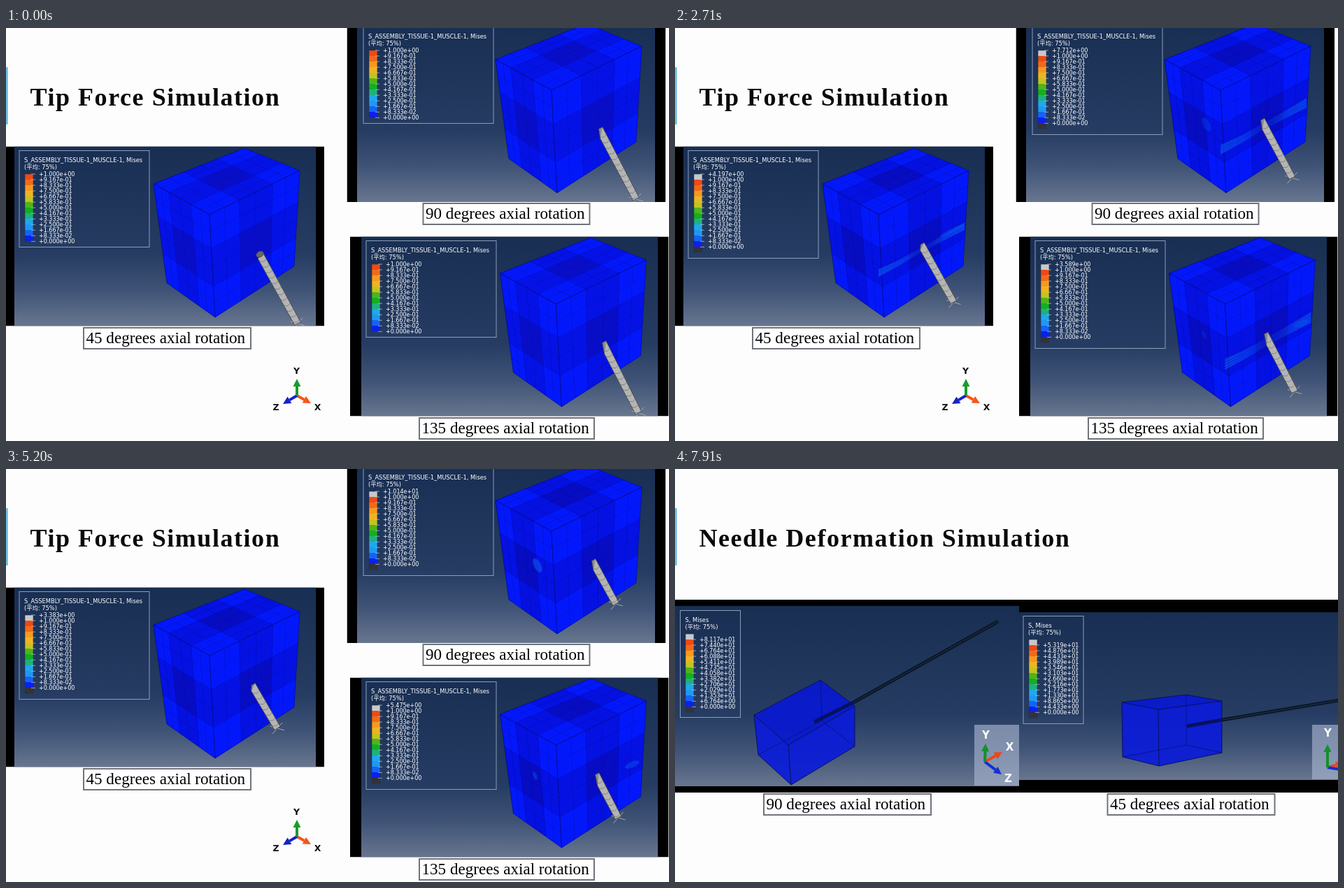
An HTML page with a canvas that plays this animation: 948x591 px, repeating every 8 s.

```html
<!DOCTYPE html>
<html lang="en">
<head>
<meta charset="utf-8">
<title>Needle simulation</title>
<style>
html, body { margin: 0; width: 100%; height: 100%; overflow: hidden; background: #fdfdfd; }
canvas { display: block; }
</style>
</head>
<body>
<canvas id="stage" width="948" height="591"></canvas>
<script>
const g = document.getElementById('stage').getContext('2d');
const SANS = '"DejaVu Sans", "Noto Sans CJK SC", "Noto Sans CJK", sans-serif';
const SERIF = '"Liberation Serif", serif';
const LOOP = 8000, CUT = 6260;
const SCALE = ['#ee4a14', '#f26a18', '#f59a1c', '#f0b422', '#c4c41c', '#50b41c',
  '#12b020', '#20b080', '#1ea8ee', '#1e98f4', '#1464f4', '#0a20f0'];

const lerp = (a, b, k) => a + (b - a) * k;
const mix = (p, q, k) => [lerp(p[0], q[0], k), lerp(p[1], q[1], k)];

// Value at time t on the shared key times
const KEYS = [0, 1120, 1850, 3470, 5200];
function at(t, v) {
  if (t >= KEYS[4]) return v[4];
  const i = KEYS.findLastIndex(k => k <= t);
  return lerp(v[i], v[i + 1], (t - KEYS[i]) / (KEYS[i + 1] - KEYS[i]));
}

// The clips advance in uneven steps
const STEPS = [0, 200, 530, 1120, 1320, 1520, 1850, 2050, 2380, 2580, 2910];
function snap(t) {
  if (t < 2910) return STEPS.findLast(s => s <= t);
  if (t >= 5200) return 5200;
  const s = 2910 + Math.floor((t - 2910) / 70) * 70;
  return s > 4800 && s < 5060 ? 4800 : s;
}

function text(s, x, y, font, color = '#000', spacing = 0, align = 'left') {
  g.font = font;
  g.fillStyle = color;
  g.textAlign = align;
  g.letterSpacing = spacing + 'px';
  g.fillText(s, x, y);
}

function path(points, closed = true) {
  g.beginPath();
  points.forEach(p => g.lineTo(p[0], p[1]));
  if (closed) g.closePath();
}

function fill(points, color) {
  path(points);
  g.fillStyle = color;
  g.fill();
}

function line(points, color, width = 1) {
  path(points, false);
  g.strokeStyle = color;
  g.lineWidth = width;
  g.stroke();
}

function rect(x0, y0, x1, y1, color) {
  g.fillStyle = color;
  g.fillRect(x0, y0, x1 - x0, y1 - y0);
}

function backdrop(x0, y0, x1, y1) {
  const sky = g.createLinearGradient(0, y0, 0, y1);
  sky.addColorStop(0, '#182e52');
  sky.addColorStop(0.6, '#263c62');
  sky.addColorStop(0.8, '#3f5376');
  sky.addColorStop(1, '#68768f');
  rect(x0, y0, x1, y1, sky);
}

function sci(v) {
  if (v < 1e-9) return '+0.000e+00';
  const [m, e] = v.toExponential(3).split('e');
  return `+${m}e${e[0]}0${e.slice(1)}`;
}

// Colour bar with its labels; x, y is the top left of the bar
function bar(x, y, labels, capped) {
  const colors = capped ? ['#c8c8cc', ...SCALE, '#333336'] : SCALE;
  colors.forEach((c, i) => rect(x, y + i * 8, x + 12, y + i * 8 + 8, c));
  g.strokeStyle = '#26324a';
  g.lineWidth = 0.6;
  g.strokeRect(x, y, 12, colors.length * 8);
  const first = capped && labels.length === 13 ? y + 8 : y;
  labels.forEach((s, i) => {
    const ly = first + i * 8.03;
    line([[x + 9, ly], [x + 15, ly]], '#c4ccd8', 0.7);
    text(s, x + 20, ly + 2.9, '8px ' + SANS, '#fff');
  });
}

function legend(title, x, y, w, h) {
  g.strokeStyle = '#8c9db8';
  g.lineWidth = 1;
  g.strokeRect(x + 0.5, y + 0.5, w, h);
  text(title, x + 7.5, y + 16.5, '8.3px ' + SANS, '#fff');
  text('(平均: 75%)', x + 7.5, y + 26.5, '8.3px ' + SANS, '#fff');
}

function caption(s, x, y, w) {
  rect(x, y, x + w, y + 32, '#6f747b');
  rect(x + 2, y + 2, x + w - 2, y + 30, '#fff');
  text(s + ' degrees axial rotation', x + 4.5, y + 23, '23.1px ' + SERIF);
}

function heading(s) {
  rect(0.5, 56, 2.3, 138, '#2ea3d6');
  text(s, 34.5, 110.5, 'bold 36px ' + SERIF, '#0a0a0a', 1.55);
}

function arrow(a, b, color, width = 4) {
  const d = Math.hypot(b[0] - a[0], b[1] - a[1]);
  const ux = (b[0] - a[0]) / d, uy = (b[1] - a[1]) / d;
  const n = [b[0] - ux * 11, b[1] - uy * 11];
  line([a, n], color, width);
  fill([b, [n[0] - uy * 5.5, n[1] + ux * 5.5], [n[0] + uy * 5.5, n[1] - ux * 5.5]], color);
}

// Block face; the mesh is denser, and so darker, inside the u and v ranges
const TONES = ['#0318fa', '#0512e6', '#080ec8'];
function face(a, b, c, d, [u0, u1], [v0, v1], dense) {
  const p = (u, v) => mix(mix(a, b, u), mix(d, c, u), v);
  const us = [0, u0, u1, 1], vs = [0, v0, v1, 1];
  const across = (k, color) => line([p(k, 0), p(k, 1)], color, 0.7);
  const along = (k, color) => line([p(0, k), p(1, k)], color, 0.7);
  fill([a, b, c, d], TONES[0]);
  for (let i = 0; i < 3; i++) for (let j = 0; j < 3; j++) {
    const [u, U, v, V] = [us[i], us[i + 1], vs[j], vs[j + 1]];
    fill([p(u, v), p(U, v), p(U, V), p(u, V)], TONES[(i === 1) + (j === 1)]);
  }
  for (let i = 0; i < 3; i++) {
    for (const k of [us[i], (us[i] + us[i + 1]) / 2]) across(k, 'rgba(6,10,130,.38)');
    for (const k of [vs[i], (vs[i] + vs[i + 1]) / 2]) along(k, 'rgba(6,10,130,.38)');
  }
  if (dense) for (let k = 0.04; k < 1; k += 0.08) {
    across(lerp(u0, u1, k), 'rgba(4,8,120,.16)');
    along(lerp(v0, v1, k), 'rgba(4,8,120,.16)');
  }
  line([a, b, c, d, a], 'rgba(6,12,120,.6)', 0.9);
}

function patch(x, y, rx, ry, turn, alpha) {
  if (alpha <= 0) return;
  g.save();
  g.globalAlpha = alpha;
  g.translate(x, y);
  g.rotate(turn);
  g.beginPath();
  g.ellipse(0, 0, rx, ry, 0, 0, 7);
  g.fillStyle = '#0a52ee';
  g.fill();
  g.clip();
  for (let i = -rx; i < rx; i += 3) line([[i, -ry], [i + 2, ry]], '#127cdc', 0.7);
  g.restore();
}

// Strongest at both outer edges, faint around the needle
function stressBand(t, thick) {
  const alpha = t < 530 ? 0 : at(t, [0, 0.95, 0.8, 0, 0]);
  if (alpha <= 0) return;
  const shade = rgb => {
    const s = g.createLinearGradient(291, 0, 414, 0);
    [[0, 1], [0.25, 0.75], [0.45, 0.3], [0.6, 0.3], [0.8, 0.8], [1, 1]]
      .forEach(([k, a]) => s.addColorStop(k, `rgba(${rgb},${a})`));
    return s;
  };
  g.save();
  g.globalAlpha = alpha;
  const top = [[291, 345], [322, 331], [353, 314], [384, 296], [414, 278]];
  const low = top.map(([x, y], i) => [x, y + thick - (i === 2 ? 5 : i % 2 * 3)]);
  fill([...top, ...low.slice().reverse()], shade('10,92,236'));
  for (const k of [0.2, 0.45, 0.7, 0.92])
    line(top.map((p, i) => mix(p, low[i], k)), shade('20,142,222'), 0.8);
  g.restore();
}

function needle(t, shift, bevel) {
  const tip = [at(t, [362, 355, 352, 352, 352]) - shift * 0.5, at(t, [322, 314, 310, 309, 309])];
  const end = [at(t, [417, 408, 403, 393, 388]) - shift, at(t, [423, 410, 402, 381, 371])];
  const len = Math.hypot(end[0] - tip[0], end[1] - tip[1]);
  for (const [x, y] of [[10, 3], [7, -8]])
    line([[end[0] - x, end[1] - y], [end[0] + x, end[1] + y]], '#aab2be', 0.9);
  g.save();
  g.translate(...tip);
  g.rotate(Math.atan2(end[1] - tip[1], end[0] - tip[0]));
  const body = [[0, -5], [len, -4.8], [len, 4.8], [bevel, 5.5], [0, 1]];
  fill(body, '#b4b4b2');
  fill([[0, -5], [bevel, 5.5], [0, 1]], '#8a8c8c');
  for (let x = 12; x < len; x += 9) line([[x, -5], [x + 2, 0], [x - 1, 5]], '#74767a', 0.7);
  path(body);
  g.strokeStyle = '#44464e';
  g.lineWidth = 0.8;
  g.stroke();
  if (t < 200 && bevel < 8) {
    g.beginPath();
    g.ellipse(2, 0, 4, 5.5, 0, 0, 7);
    g.fillStyle = '#66686a';
    g.fill();
    g.stroke();
  }
  g.restore();
}

const [A, B, C, D, E, F, G] = [[211, 223], [341, 172], [420, 204], [291, 267],
  [299, 414], [230, 365], [412, 341]];
// Dense ranges along the width, depth and height of the block
const WIDE = [0.33, 0.7], DEEP = [0.27, 0.67], HIGH = [0.33, 0.7];
// frame: outer left/right, picture left/right, top, bottom
const PANELS = [
  { frame: [0, 455, 12, 443, 169.5, 426.5], block: [0, 0], key: [0, 0], shift: 0, bevel: 7, thick: 11,
    peak: [0, 2.467, 3.483, 5.068, 3.383],
    spots: [[396, 290, 19, 3, -0.44, [0, 0, 0, 0.8, 0]]] },
  { frame: [487.5, 943, 502, 928, -7, 249], block: [489, -178], key: [492, -177], shift: 5, bevel: 13, thick: 14,
    peak: [0, 4.890, 5.912, 9.907, 10.14],
    spots: [[271, 316, 11, 5, 1.1, [0, 0, 0, 0.55, 0.55]]] },
  { frame: [492, 947.5, 508, 932, 298.5, 555.5], block: [495.5, 128], key: [496, 129], shift: 8, bevel: 16, thick: 16,
    peak: [0, 3.650, 1.840, 5.721, 5.475],
    spots: [[400, 295, 11, 4, -0.4, [0, 0, 0, 0.8, 0.4]], [261, 311, 6, 2.5, 1.2, [0, 0, 0, 0.4, 0.4]]] }
];
const UNIT = Array.from({ length: 13 }, (_, i) => sci(1 - i / 12));

function panel(p, t) {
  const [x0, x1, px0, px1, y0, y1] = p.frame;
  const touched = t >= 530;
  g.save();
  g.beginPath();
  g.rect(x0, y0, x1 - x0, y1 - y0);
  g.clip();
  rect(x0, y0, x1, y1, '#000');
  backdrop(px0, y0, px1, y1);
  g.save();
  g.translate(...p.key);
  legend('S_ASSEMBLY_TISSUE-1_MUSCLE-1, Mises', 18.5, 175, 186, touched ? 154 : 138);
  bar(27, 209, touched ? [sci(at(t, p.peak)), ...UNIT] : UNIT, touched);
  g.restore();
  g.translate(...p.block);
  face(A, B, C, D, WIDE, DEEP, touched);
  face(A, D, E, F, DEEP, HIGH, touched);
  face(D, C, G, E, WIDE, HIGH, touched);
  stressBand(t, p.thick);
  for (const [x, y, rx, ry, turn, alpha] of p.spots) patch(x, y, rx, ry, turn, at(t, alpha));
  needle(t, p.shift, p.bevel);
  g.restore();
}

function tipScene(t) {
  heading('Tip Force Simulation');
  PANELS.forEach(p => panel(p, t));
  caption('45', 110, 428, 241);
  caption('90', 595.5, 250, 240);
  caption('135', 590, 557, 252);
  const o = [416, 526];
  arrow(o, [436, 537], '#f4561a');
  arrow(o, [396, 538], '#1422c8');
  arrow(o, [416, 502], '#1c9a2c');
  [['Y', 415.5, 495], ['X', 445.5, 547], ['Z', 386, 547]]
    .forEach(([s, x, y]) => text(s, x, y, 'bold 12.5px ' + SANS, '#111', 0, 'center'));
}

// Translucent block: top left, top back, top right, top front, then the same below
function glassBlock([a, b, c, d, e, f, h, i], from, entry, tip) {
  line([from, entry], '#0a1626', 5);
  line([from, entry], '#20344e', 1);
  fill([a, b, c, h, i, e], 'rgba(10,28,216,.92)');
  fill([a, b, c, d], 'rgba(8,24,190,.4)');
  line([e, f, h], 'rgba(4,12,90,.7)', 0.8);
  line([b, f], 'rgba(4,12,90,.7)', 0.8);
  line([entry, tip], 'rgba(6,16,80,.85)', 5);
  line([a, b, c, d, a, e, i, h, c], '#07115c', 1);
  line([d, i], '#07115c', 1);
}

function triad(o, x, y, z, labels) {
  arrow(o, x, '#e8481c');
  arrow(o, z, '#1230d0');
  arrow(o, y, '#12902c');
  labels.forEach(([s, lx, ly]) => text(s, lx, ly, 'bold 15px ' + SANS, '#fff', 0, 'center'));
}

const shares = max => Array.from({ length: 13 }, (_, i) => sci(max * (1 - i / 12)));

function bendScene(t) {
  const k = Math.min(1, Math.max(0, (t - CUT) / (7910 - CUT)));
  const loaded = t >= CUT + 70;
  heading('Needle Deformation Simulation');
  rect(0, 187, 948, 463, '#000');
  backdrop(0, 196, 492, 454);
  backdrop(492, 205, 948, 445);

  legend('S, Mises', 7, 202, 86, 153);
  bar(15, 236, shares(81.168), true);
  glassBlock([[113, 352], [208, 302], [257, 339], [162, 395],
    [119, 409], [210, 360], [257, 397], [166, 452]],
    [lerp(480, 462, k), lerp(208, 218, k)], [257, lerp(336, 333, k)],
    [lerp(231, 199, k), lerp(351, 362, k)]);

  legend('S, Mises', 497.5, 210, 86, loaded ? 154 : 138);
  bar(506, 244, shares(loaded ? 53.192 * k : 0), loaded);
  glassBlock([[639, 334], [731, 323], [782, 332], [691, 344],
    [640, 412], [731, 395], [782, 406], [692, 425]],
    [950, 331], [782, lerp(357.5, 359, k)], [lerp(755, 732, k), lerp(362, 368, k)]);

  rect(428, 366, 492, 453, 'rgba(172,184,210,.62)');
  triad([443, 419], [468, 405], [444, 393], [467, 437], [['Y', 444.5, 386], ['X', 478.5, 403], ['Z', 476.5, 448]]);
  rect(911, 366, 948, 444, 'rgba(172,184,210,.62)');
  triad([933, 427], [956, 421], [933, 394], [962, 432], [['Y', 933.5, 383]]);
  caption('90', 126, 464, 241);
  caption('45', 617.5, 464, 241);
}

function draw(now) {
  const t = now % LOOP;
  rect(0, 0, 948, 591, '#fdfdfd');
  if (t < CUT) tipScene(snap(t));
  else bendScene(t);
  requestAnimationFrame(draw);
}
requestAnimationFrame(draw);
</script>
</body>
</html>
```
